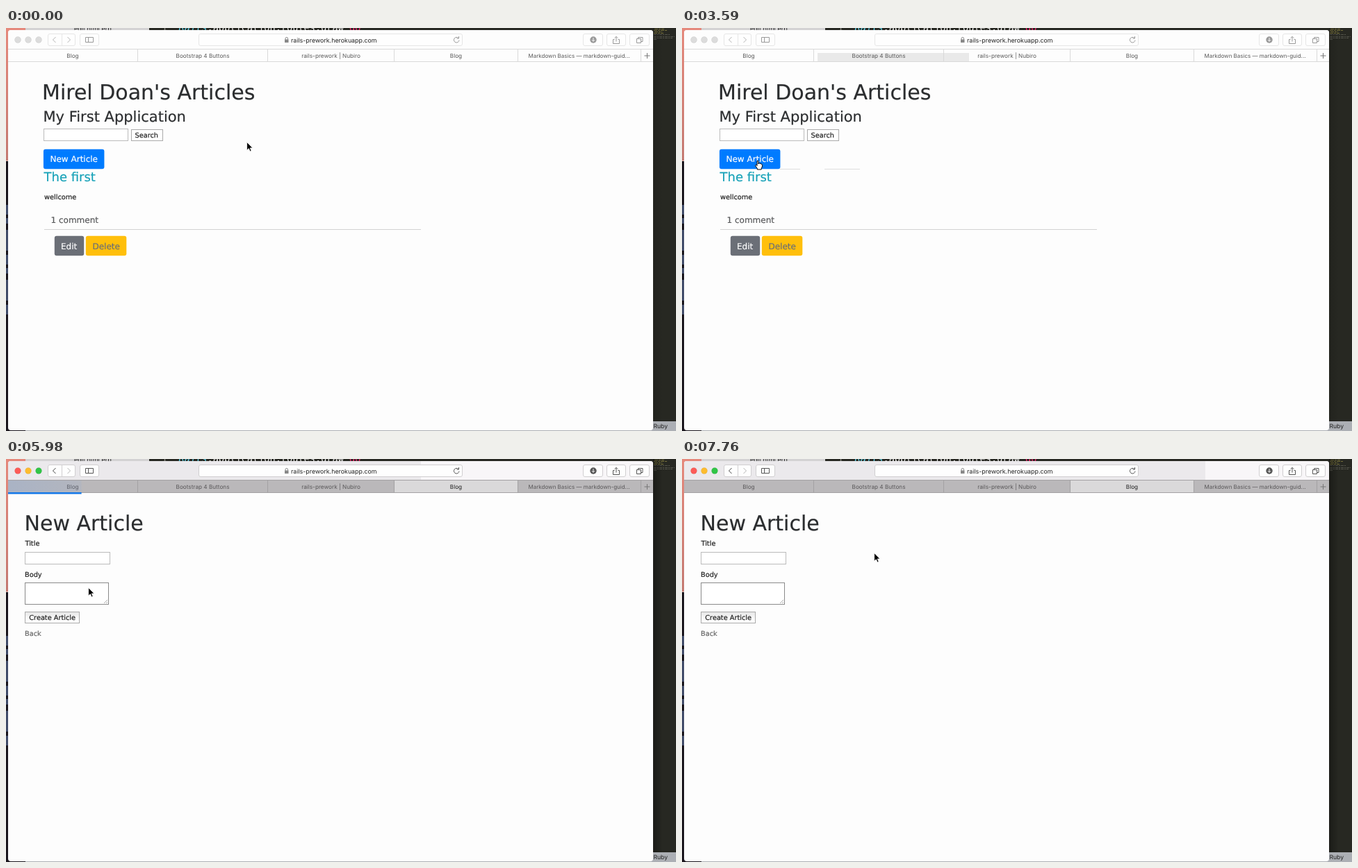
Write an HTML page that moves like this. It is 964 px wide and 581 px high and loops after 8000 ms.

```html
<!DOCTYPE html>
<html lang="en">
<head>
<meta charset="utf-8">
<title>Articles</title>
<style>
html, body { margin: 0; height: 100%; overflow: hidden; background: #272822; }
svg { display: block; width: 100vw; height: 100vh;
  --bar: #fdfdfd; --tab: #fdfdfd; --cur: #fdfdfd; --sep: #d9d9d9; --edge: #e6e6e6;
  --icon: #999; --label: #5a5a5a; --curLabel: #5a5a5a; --btn: #007bff; --shade: .4;
  --red: #dcdcdc; --yel: #dcdcdc; --grn: #dcdcdc; }
svg.on { --bar: #f8f6f8; --tab: #bab8ba; --cur: #dad9da; --sep: #a3a1a3; --edge: #d0ced0;
  --icon: #555; --label: #5a585a; --curLabel: #222; --btn: #0069d9; --shade: 1;
  --red: #fc5b57; --yel: #fdbc2e; --grn: #30c546; }
text { font: 9.75px "DejaVu Sans", sans-serif; text-rendering: geometricPrecision; white-space: pre;
  color: #222; fill: currentColor; stroke: currentColor; stroke-width: .2; }
.ui { font: 8.2px Inter, sans-serif; stroke: none; }
.tabs text { text-anchor: middle; color: var(--label); }
.code { font: 13.6px "DejaVu Sans Mono", monospace; color: #eee; stroke: none; }
.h1 { font-size: 30px; color: #2b2d2f; }
.h2 { font-size: 21px; color: #2b2d2f; }
.h3 { font-size: 18px; color: #17a2b8; }
.md { font-size: 12px; }
.box { fill: #fff; stroke: #bbb; }
.tool { fill: #fefefe; stroke: var(--edge); }
.icon { fill: none; stroke: var(--icon); }
</style>
</head>
<body>
<svg id="stage" viewBox="0 0 964 581" preserveAspectRatio="none">
  <defs>
    <linearGradient id="dusk" x2="0" y2="1">
      <stop stop-color="#e5897c"/><stop offset="1" stop-color="#c47a72"/>
    </linearGradient>
    <linearGradient id="shade">
      <stop stop-color="#000" stop-opacity=".3"/><stop offset="1" stop-color="#000" stop-opacity="0"/>
    </linearGradient>
    <linearGradient id="raised" x2="0" y2="1">
      <stop stop-color="#e6e6e6"/><stop offset=".55" stop-color="#f8f8f8"/><stop offset="1" stop-color="#fff"/>
    </linearGradient>
    <linearGradient id="glow">
      <stop stop-color="#7fa6e0" stop-opacity=".28"/><stop offset="1" stop-color="#7fa6e0" stop-opacity=".12"/>
    </linearGradient>
    <clipPath id="frame"><rect x="3" y="3" width="928" height="577" rx="4"/></clipPath>
  </defs>

  <!-- desktop and editor behind the browser -->
  <rect width="964" height="581" fill="#272822"/>
  <rect width="28" height="191" fill="url(#dusk)"/>
  <path d="M0 191.5H4" stroke="#e3c4bc"/>
  <rect y="192" width="28" height="389" fill="#1a161d"/>
  <path d="M1.5 255V415" stroke="#414c69" stroke-width="3" stroke-dasharray="14 5 8 9 30 6"/>
  <rect x="28" width="178" height="4" fill="#d3d2d3"/>
  <text class="ui" x="98" y="4" style="font-size:9px">edit.html.erb</text>
  <text class="code" x="224" y="4"><tspan fill="#90908a">1  </tspan><tspan fill="#66d9ef" font-style="italic">Rails</tspan>.application.routes.draw <tspan fill="#f92672">do</tspan></text>
  <g fill="none" opacity=".55">
    <path d="M933 1.5H947M932 3.5H951M933 5.5H944M932 7.5H946" stroke="#b5a94e" stroke-dasharray="5 1 3 1"/>
    <path d="M932 9.5H956M932 12.5H962M932 14.5H959M932 16.5H936" stroke="#77776c" stroke-dasharray="4 1 2 1"/>
  </g>
  <rect x="28" y="567" width="936" height="14" fill="#acafb4"/>
  <text class="ui" x="931.5" y="577" style="font-size:8.6px">Ruby</text>
  <rect x="931" width="14" height="567" fill="url(#shade)" opacity="var(--shade)" style="opacity:var(--shade)"/>

  <g clip-path="url(#frame)">
    <rect x="3" y="3" width="928" height="577" fill="#fdfdfd"/>
    <rect x="3" y="3" width="928" height="28" fill="var(--bar)"/>
    <rect id="tint" x="3" y="3" height="28" fill="#ebe9ec"/>
    <g stroke="#000" stroke-opacity=".1" stroke-width=".6">
      <circle cx="17" cy="17" r="4.5" fill="var(--red)"/>
      <circle cx="32" cy="17" r="4.5" fill="var(--yel)"/>
      <circle cx="47" cy="17" r="4.5" fill="var(--grn)"/>
    </g>
    <g class="tool">
      <rect x="60.5" y="8.5" width="39" height="17" rx="2.5"/>
      <path d="M80.5 9V25"/>
      <rect x="106.5" y="8.5" width="27" height="17" rx="2.5"/>
      <rect x="277.5" y="8.5" width="379" height="17" rx="2.5"/>
      <rect x="830.5" y="8.5" width="28" height="17" rx="2.5"/>
      <rect x="864.5" y="8.5" width="27" height="17" rx="2.5"/>
      <rect x="897.5" y="8.5" width="28" height="17" rx="2.5"/>
    </g>
    <g class="icon">
      <path id="back" d="M71.5 13L67.5 17L71.5 21"/>
      <path d="M88.5 13L92.5 17L88.5 21" stroke="#b5b5b5"/>
      <path d="M114.5 13.5H125.5V20.5H114.5ZM118.5 13.5V20.5"/>
      <path d="M651 14.6A3.8 3.8 0 1 0 652 17.6M651.5 12V15H648.5"/>
      <path d="M875.5 16.5H873.5V22.5H882.5V16.5H880.5M878 19.5V12.5M875.8 14.5L878 12.3L880.2 14.5"/>
      <path d="M907.5 15.5H913.5V21.5H907.5ZM909.5 15.5V13.5H916V19.5H913.5"/>
      <circle cx="845" cy="17" r="4.7" fill="var(--icon)" stroke="none"/>
      <path d="M845 14.2V19M843 17.3L845 19.3L847 17.3" stroke="#fff"/>
      <rect x="401" y="16.5" width="5.5" height="4.5" fill="#888" stroke="none"/>
      <path d="M402 17V15.2A1.7 1.7 0 0 1 405.5 15.2V17" stroke="#888"/>
    </g>
    <text class="ui" x="410" y="20.5" style="font-size:8.85px">rails-prework.herokuapp.com</text>

    <g class="tabs">
      <rect x="3" y="31" width="928" height="17" fill="var(--tab)"/>
      <rect x="559" y="31" width="178" height="17" fill="var(--cur)"/>
      <rect id="smear" y="36" height="12" fill="#e9e9e9"/>
      <path d="M3 30.5H931M3 48.5H931M189.5 31V48M376.5 31V48M558.5 31V48M736.5 31V48M913.5 31V48" stroke="var(--sep)"/>
      <path d="M918.5 40H926.5M922.5 36V44" stroke="#777"/>
      <text class="ui" x="96" y="42.5">Blog</text>
      <text class="ui" x="283" y="42.5">Bootstrap 4 Buttons</text>
      <text class="ui" x="467.5" y="42.5">rails-prework | Nubiro</text>
      <text class="ui" x="647.5" y="42.5" style="color:var(--curLabel)">Blog</text>
      <text class="ui" x="824.5" y="42.5" style="font-size:8px">Markdown Basics — markdown-guid...</text>
    </g>
    <g id="load">
      <rect id="haze" x="3" y="31" height="17" fill="url(#glow)"/>
      <rect id="fill" x="3" y="48" height="2.5" fill="#1478e8"/>
    </g>

    <g id="list">
      <text class="h1" x="52" y="102.5">Mirel Doan's Articles</text>
      <text class="h2" x="53.5" y="134.5">My First Application</text>
      <rect class="box" x="54.5" y="145.5" width="121" height="17"/>
      <rect class="box" x="180.5" y="146.5" width="45" height="16" style="stroke:#aaa"/>
      <text x="185.5" y="158">Search</text>
      <path id="trace1" d="M205 203.5H256" stroke="#dedede"/>
      <path id="trace2" d="M141 203.5H170" stroke="#dedede"/>
      <rect x="53.9" y="174.7" width="87.5" height="28.5" rx="3" fill="var(--btn)"/>
      <text class="md" x="63.5" y="193.3" style="color:#fff">New Article</text>
      <text class="h3" x="54.5" y="220.5">The first</text>
      <text x="55" y="247">wellcome</text>
      <text class="md" x="64.5" y="280.5" style="color:#58595b">1 comment</text>
      <path d="M55 290.5H597" stroke="#d2d2d2"/>
      <rect x="69.8" y="299.7" width="42.4" height="28.5" rx="3" fill="#6b6f77"/>
      <text class="md" x="79" y="318.5" style="color:#fff">Edit</text>
      <rect x="114.8" y="299.7" width="58.5" height="28.5" rx="3" fill="#ffbf0b"/>
      <text class="md" x="124.5" y="318.5" style="color:#6b6f77">Delete</text>
    </g>

    <g id="form">
      <text class="h1" x="26.5" y="102.5">New Article</text>
      <text x="27.5" y="125">Title</text>
      <rect class="box" x="27.5" y="134.5" width="122" height="17"/>
      <text x="27" y="170">Body</text>
      <rect class="box" x="27.5" y="178.5" width="120" height="31" style="stroke:#8a8a8a"/>
      <path d="M141 208L146 203M144 208L146 206" stroke="#999" stroke-width=".8"/>
      <rect x="27.5" y="220.5" width="78" height="16" fill="url(#raised)" stroke="#aaa"/>
      <text x="33.3" y="232.3">Create Article</text>
      <text x="27" y="255.3" style="color:#666">Back</text>
    </g>
  </g>

  <g id="cursor" stroke-linejoin="round">
    <path id="arrow" d="M-.4-.4V11.2L2.3 8.7L4.2 13L6.1 12.2L4.3 8H7.9Z" fill="#000" stroke="#fff" stroke-width=".8"/>
    <path id="hand" d="M-1 1Q0-.6 1 1V5L1.2 4Q2.5 3.2 3 4.6Q4.4 3.8 4.8 5.2Q6.3 4.8 6.4 6.5V9L5.2 11.5V13H-.7V11.5L-3.4 7.6Q-3.5 6-1.8 6.6L-1 7.5Z" fill="#fff" stroke="#000"/>
  </g>
</svg>
<script>
const $ = id => document.getElementById(id);
const show = (id, on) => $(id).style.display = on ? '' : 'none';
const setWidth = (id, w) => $(id).setAttribute('width', w);

// pointer tip: time, x, y; two clockwise loops, then the button
const path = [
  [0, 347, 165], [300, 265, 140], [450, 196, 92], [600, 290, 36], [750, 404, 72],
  [900, 395, 96], [1050, 324, 150], [1200, 247, 176], [1350, 247, 177],
  [1650, 205, 189], [1800, 209, 222], [1950, 195, 258], [2100, 158, 272],
  [2240, 117, 235], [2390, 161, 185], [2540, 135, 179], [2690, 107, 187],
  [2840, 107, 181], [2990, 108, 185], [3140, 108, 189], [3290, 109, 191],
  [4780, 118, 186], [4930, 119, 186],
  [7460, 160, 181], [7610, 232, 158], [7760, 277, 136]
];

function draw(now) {
  const t = now % 8000;
  const active = t >= 3730, onForm = t >= 5830;
  const hand = t >= 2690 && t < 5230;
  const [, x, y] = path.findLast(p => p[0] <= t);

  $('stage').classList.toggle('on', active);

  // grey left along the tabs where the pointer passed
  show('smear', t >= 600 && !active);
  $('smear').setAttribute('x', 195);
  setWidth('smear', t < 750 ? 104 : 218);
  show('trace1', t >= 1650 && !active);
  show('trace2', t >= 2390 && !active);

  show('list', !onForm);
  show('form', onForm);
  show('arrow', !hand);
  show('hand', hand);
  $('cursor').setAttribute('transform', `translate(${x} ${y})`);
  $('back').style.stroke = t >= 5230 ? '#444' : '#b5b5b5';

  // page load progress advances in ticks, then leaps before it ends
  const loaded = t < 6720 ? 57 + 48.6 * Math.floor((t - 5830) / 150 + .01) : 750;
  show('load', onForm && t < 6870);
  for (const id of ['haze', 'fill']) setWidth(id, Math.max(0, loaded));
  setWidth('tint', !onForm ? 0 : t < 6720 ? 594 : 750);

  requestAnimationFrame(draw);
}
requestAnimationFrame(draw);
</script>
</body>
</html>
```
